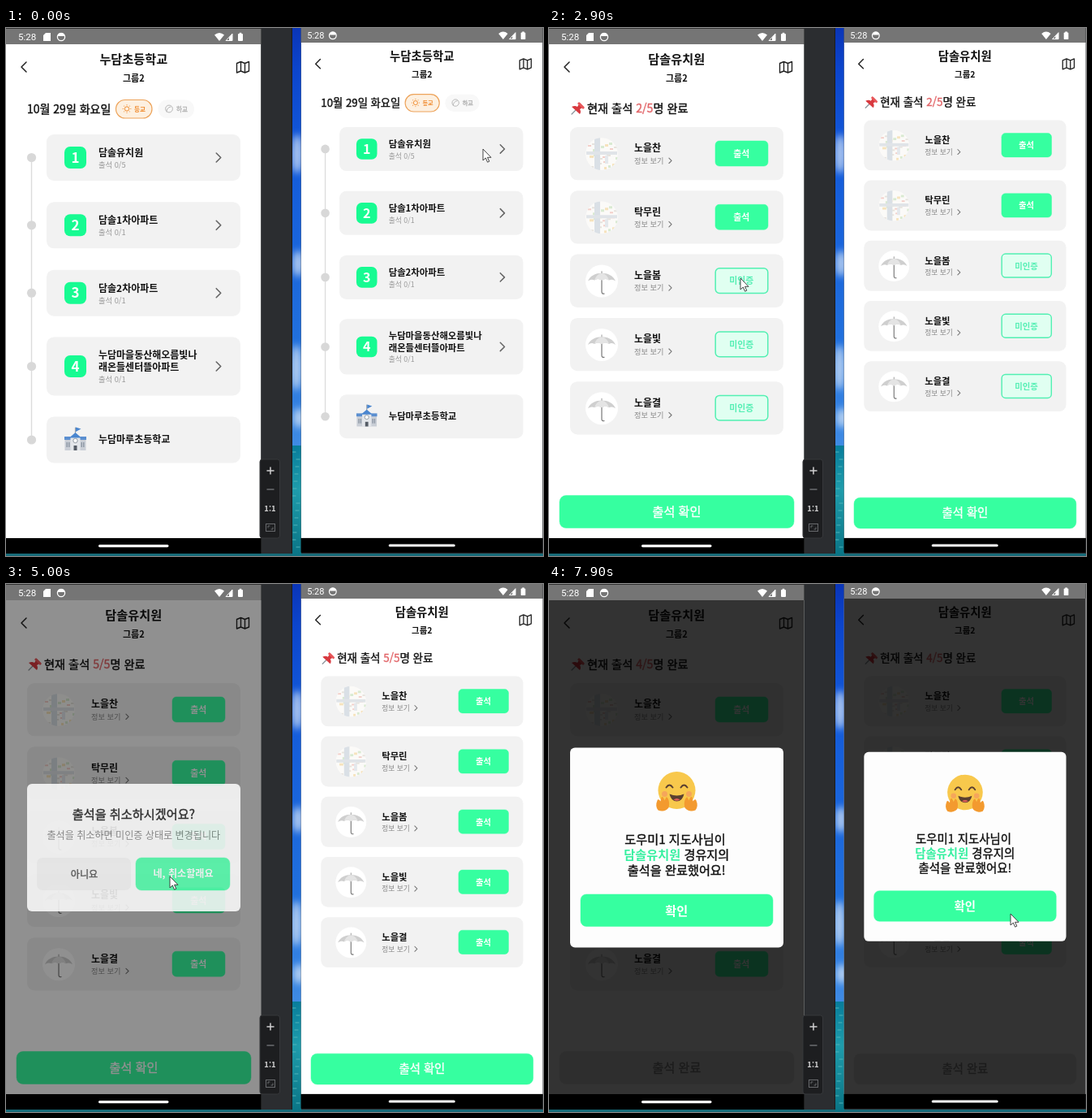
Animation, 662 px wide and 650 px high, one loop 8000 ms. Source, as an HTML page:

```html
<!DOCTYPE html>
<html lang="ko">
<head>
<meta charset="utf-8">
<title>출석 확인</title>
<style>
  html, body { margin: 0; width: 100%; height: 100%; overflow: hidden; background: #2b2d30; }
  svg { display: block; width: 662px; height: 650px; }
  text { font-family: "Noto Sans CJK KR", "Noto Sans CJK", sans-serif; }
  .clock { font-family: Roboto, sans-serif; }
  .line { fill: none; stroke-linecap: round; stroke-linejoin: round; }
</style>
</head>
<body>
<svg id="stage" viewBox="0 0 662 650" xmlns="http://www.w3.org/2000/svg"></svg>
<script>
const LOOP = 8000, STEP = 100;
const GREEN = '#36ffa0', CARD = '#f2f2f2', WIDTH = 314.4;
const SITE = '담솔유치원';
const PEOPLE = ['노을찬', '탁무린', '노을봄', '노을빛', '노을결'];

// Stops: centre, height, title lines
const STOPS = [
  [159.5, 57, [SITE]],
  [242.8, 57, ['담솔1차아파트']],
  [326.2, 57, ['담솔2차아파트']],
  [416.5, 72, ['누담마을동산해오름빛나', '래온들센터뜰아파트']],
  [507, 57, ['누담마루초등학교']]
];
// When each child is marked present
const MARKED = [1000, 1500, 3100, 4200, 3800];
const CANCELLED = 5100, FINISHED = 7200;

const PHONES = [
  { id: 'a', place: '', bottom: 628, head: 0, mid: 0, clock: 15, dot: 68, card: true, opens: 2300 },
  { id: 'b', place: 'translate(363.7 -2.2) scale(.9475)', bottom: 665, head: 1, mid: 19, clock: 8, dot: 41.3, opens: 300 }
];

// Time, x, y of the pointer tip
const PATH = [
  [0, 588, 149], [300, 588, 149], [800, 590, 144], [1000, 590, 144], [1300, 590, 218],
  [1500, 590, 218], [2000, 208, 159], [2300, 208, 159], [2900, 236, 308], [3200, 236, 308],
  [3600, 601, 432], [3800, 601, 432], [4150, 236, 386], [4500, 236, 386], [4800, 202, 360],
  [5200, 202, 360], [5900, 609, 628], [6050, 609, 628], [6350, 540, 598], [6500, 540, 598],
  [6900, 573, 379], [7200, 573, 379], [7600, 569, 406], [8000, 569, 406]
];

const rect = (x, y, w, h, fill, r = 0, more = '') =>
  `<rect x="${x}" y="${y}" width="${w}" height="${h}" rx="${r}" fill="${fill}" ${more}/>`;
const circle = (x, y, r, fill, more = '') => `<circle cx="${x}" cy="${y}" r="${r}" fill="${fill}" ${more}/>`;
const line = (d, color, width = 1.5) => `<path class="line" d="${d}" stroke="${color}" stroke-width="${width}"/>`;
const shape = (d, fill) => `<path d="${d}" fill="${fill}"/>`;
const group = (body, attrs = '') => `<g ${attrs}>${body}</g>`;
// y is the middle of the line of text; a thin stroke stands in for the medium weight
const text = (x, y, size, str, fill = '#111', weight = 400, anchor = 'start', more = '') =>
  `<text x="${x}" y="${y + size * .37}" font-size="${size}" fill="${fill}" font-weight="${weight === 500 ? 400 : weight}" text-anchor="${anchor}" ${weight === 500 ? `stroke="${fill}" stroke-width=".4"` : ''} ${more}>${str}</text>`;
const mid = (y, size, str, fill, weight, x = 157.3) => text(x, y, size, str, fill, weight, 'middle');
const chevron = (x, y, s, color, width) => line(`M${x - s / 2} ${y - s}l${s} ${s}l${-s} ${s}`, color, width);
const button = (x, y, w, h, r, more = '') =>
  rect(x, y, w, h, GREEN, r, `stroke="${GREEN}" stroke-opacity=".5" ${more}`);

function defs() {
  let blocks = '';
  for (let i = 0; i < 26; i++) {
    const x = -18 + (i * 7) % 37, y = -17 + (i * 11) % 34;
    blocks += rect(x, y, 3 + i % 3, 2 + i % 2, ['#f3cfc9', '#d9ead2', '#e6e3dd', '#f6e3bd'][i % 4]);
  }
  const map = circle(0, 0, 20, '#fbfaf8') + blocks +
    rect(-9, -20, 7, 40, '#dae0e6') + rect(-19, -3, 38, 4, '#e0e4e8') + rect(4, 2, 4, 10, '#e4e8ec');
  const umbrella = circle(0, 0, 20, '#fff') +
    line('M0 -8V13q0 3 3 2.500', '#777', 1.2) +
    shape('M-17 0C-12 -13 12 -13 17 0Q13 -3 9 -1Q5 -4 0 -1Q-5 -4 -9 -1Q-13 -3 -17 0Z', '#cfcfcf') +
    shape('M-9 -1Q-7 -8 0 -10Q7 -8 9 -1Q5 -4 0 -1Q-5 -4 -9 -1Z', '#e4e4e4') + line('M0 -12v2', '#999', 1);
  return `<defs>
    <linearGradient id="sky" x2="0" y2="1"><stop stop-color="#0a35b8"/><stop offset=".1" stop-color="#0c45cc"/>
      <stop offset=".3" stop-color="#135ada"/><stop offset=".75" stop-color="#2170dd"/><stop offset="1" stop-color="#3f8be4"/></linearGradient>
    <linearGradient id="sea" x2="0" y2="1"><stop stop-color="#087d9b"/><stop offset=".4" stop-color="#1f9cab"/>
      <stop offset="1" stop-color="#0a7485"/></linearGradient>
    <filter id="soft" x="-1" y="-1" width="3" height="3"><feGaussianBlur stdDeviation="4"/></filter>
    <clipPath id="round"><circle r="20"/></clipPath>
    <clipPath id="strip"><rect x="353" width="11" height="650"/></clipPath>
    ${PHONES.map(p => `<clipPath id="clip-${p.id}">${rect(0, 20 + p.head, WIDTH, p.bottom - 20 - p.head, '#000')}</clipPath>`).join('')}
    ${group(map, 'id="map" clip-path="url(#round)"')}
    ${group(umbrella, 'id="umbrella"')}
  </defs>`;
}

function desktop() {
  const clouds = [[359, 155, 24], [360, 290, 16], [358, 418, 28], [361, 480, 12]]
    .map(([x, y, h]) => `<ellipse cx="${x}" cy="${y}" rx="7" ry="${h}" fill="#dce8f6" opacity=".75" filter="url(#soft)"/>`).join('');
  let waves = '';
  for (let i = 0; i < 14; i++) waves += line(`M${353 + i * 5 % 6} ${522 + i * 9}h4`, '#4fb3b9', 1);
  return rect(0, 0, 662, 650, '#2b2d30') + rect(0, 647, 662, 3, '#176b79') +
    rect(353, 0, 11, 514, 'url(#sky)') + rect(353, 514, 11, 136, 'url(#sea)') +
    group(clouds + waves, 'clip-path="url(#strip)"') +
    rect(352, 0, 1, 647, '#1c1d20') + rect(661, 0, 1, 646, '#39424a');
}

function toolbar() {
  return rect(313, 531, 24.5, 97, '#1d1e20', 3, 'stroke="#36383b"') +
    line('M322 545h8M326 541v8', '#d0d0d0', 1.5) + line('M322 568h8', '#6b6d70', 1.5) +
    text(325.5, 591, 9.5, '1:1', '#d0d0d0', 700, 'middle') +
    rect(320.5, 610.5, 11, 9, 'none', 0, 'stroke="#686a6d"') +
    line('M323 615v-2h2M329 615v2h-2', '#686a6d', 1);
}

function status(p) {
  const body = rect(0, 1, WIDTH, 19, '#757575') +
    text(p.clock, 11, 11.6, '5:28', '#fff', 400, 'start', 'class="clock"') +
    (p.card ? shape('M49 6h6v10h-9V9Z', '#fff') : '') +
    circle(p.dot, 11, 4.6, 'none', 'stroke="#fff" stroke-width="1.3"') +
    shape(`M${p.dot - 4} 10a4 4 0 0 1 8 0Z`, '#fff') +
    shape('M257 8.500Q263 3.500 269 8.500L263 16Z', '#fff') +
    line('M271.500 15.500h7.500v-8Z', '#fff', 1) + shape('M275 16h4V7.500l-4 4Z', '#fff') +
    rect(286, 7, 6, 9, '#fff', 1) + rect(287.7, 5.8, 2.6, 2, '#fff');
  return group(body, `transform="translate(0 ${p.head * 1.2})"`);
}

const header = (p, title) => group(
  line('M25 42l-6 6 6 6', '#222', 1.5) + mid(38.5, 15.2, title, '#111', 700) + mid(61.5, 11, '그룹2', '#111', 700) +
  line('M284.500 43.500l5-2 5 2 5-2v11.500l-5 2-5-2-5 2ZM289.500 41.500v11.500M294.500 43.500v11.500', '#222', 1.4),
  `transform="translate(0 ${p.head * .9})"`);

function pills() {
  let rays = '';
  for (let i = 0; i < 8; i++) rays += `<path d="M0 -4.300v-1" transform="translate(149 99.500) rotate(${i * 45})" stroke="#f08a2c"/>`;
  return rect(135.5, 88.5, 44.5, 22.5, '#fdf0e0', 11.2, 'stroke="#eda35a" stroke-width="1.2"') +
    circle(149, 99.5, 2.7, 'none', 'stroke="#f08a2c"') + rays + text(158, 99.8, 7.6, '등교', '#f08a2c', 700) +
    rect(187.5, 88.5, 44.5, 22.5, '#f8f8f8', 11.2) +
    circle(201, 99.5, 4.4, 'none', 'stroke="#b5b5b5"') + line('M198 103q0-5 5-6', '#b5b5b5', 1) +
    text(210, 99.8, 7.6, '하교', '#b5b5b5', 500);
}

function school(x, y) {
  return group(line('M0 -6V-15', '#9aa3ad', 1.2) + shape('M.5 -15.500l6.500 2-6.500 3.500Z', '#4a86cf') +
    rect(-13, -2, 26, 15, '#c9ced6') + rect(-13.5, -4, 8, 4, '#5b8fd0') + rect(5.5, -4, 8, 4, '#5b8fd0') +
    rect(-6, -4, 12, 17, '#e3e6ea') + shape('M-7.500 -2.500L0 -9l7.500 6.500Z', '#4a86cf') +
    circle(0, 1, 2.7, '#fff', 'stroke="#7d8791" stroke-width=".8"') + rect(-2, 7, 4, 6, '#555c66') +
    [-11, -8.5, 7, 9.5].map(v => rect(v, 3, 1.5, 6, '#8f99a6')).join(''),
    `transform="translate(${x} ${y})"`);
}

function listPage(p) {
  const cards = STOPS.map(([y, h, lines], i) => {
    const last = i === 4;
    const top = last ? y : y - (lines.length > 1 ? 14 : 6);
    const body = rect(50, y - h / 2, 239, h, CARD, 9) +
      (last ? school(85.5, y) : rect(72, y - 13.5, 27, 27, '#17fb92', 7) +
        mid(y, 17, i + 1, '#fff', 700, 85.5) + chevron(262, y, 5.5, '#666', 1.6)) +
      lines.map((s, n) => text(114, top + n * 15.5, 12, s, '#111', 700)).join('') +
      (last ? '' : text(114, top + lines.length * 15.5 - .5, 9.3, `출석 0/${i ? 1 : 5}`, '#999', 400, 'start', i ? '' : `id="seen-${p.id}"`));
    return circle(31.5, y, 5.6, '#d8d8d8') + group(body, i ? '' : `id="first-${p.id}"`);
  }).join('');
  return rect(0, 19, WIDTH, p.bottom, '#fff') + header(p, '누담초등학교') +
    text(26, 99.8, 14, '10월 29일 화요일', '#111', 500) + pills() + line('M31.500 160V507', '#dcdcdc', 1.4) + cards;
}

function pin() {
  return group(line('M-1 2l-5 5', '#8a9299', 1.3) + shape('M-6 -2Q-2 -4 1 -2L4 -7L9 -2L4 1Q6 4 4 7Z', '#d8393f') +
    shape('M3 -8L10 -1L8 1L1 -6Z', '#e8575a'), 'transform="translate(34 99)"');
}

function detailPage(p) {
  const rows = PEOPLE.map((name, i) => {
    const y = 122 + 78.3 * i;
    return rect(26, y, 263, 65.3, CARD, 9) +
      `<use href="#${i < 2 ? 'map' : 'umbrella'}" x="65" y="${y + 33}"/>` +
      text(105, y + 26, 12, name, '#111', 700) + text(105, y + 41.3, 9.2, '정보 보기', '#888') +
      chevron(149.5, y + 41.3, 3.2, '#777', 1.1) +
      group(button(205, y + 17, 65, 31, 5) + mid(y + 32.7, 10.9, '출석', '#fff', 700, 237.2), `id="on-${p.id}${i}"`) +
      group(rect(205.2, y + 17.2, 64.6, 30.6, '#e0fff1', 5, 'stroke="#52f0b2" stroke-width="1.5"') +
        mid(y + 32.7, 10.9, '미인증', '#55efb4', 700, 237.2), `id="off-${p.id}${i}"`);
  }).join('');
  const footer = group(
    button(13, 575.5, 289, 40, 8, `id="bar-${p.id}"`) +
    text(157.5, 595.5, 15.1, '출석 확인', '#fff', 500, 'middle', `id="label-${p.id}"`),
    `transform="translate(0 ${p.bottom - 628})"`);
  return rect(0, 19, WIDTH, p.bottom, '#fff') + header(p, SITE) + pin() +
    text(47, 98.8, 14.2, `현재 출석 <tspan id="count-${p.id}" fill="#e2676a" stroke="#e2676a">0/5</tspan>명 완료`, '#111', 500) +
    rows + footer;
}

const panel = (y, h) => rect(26, y, 263, h, '#fdfdfd', 6);
const choices = (y, no, yes, id) => rect(38, y, 116, 40, '#f4f4f4', 7) + mid(y + 20, 12.2, no, '#555', 500, 96.5) +
  group(button(160, y, 116, 40, 7) + mid(y + 20, 12.1, yes, '#fff', 700, 218.5), `id="${id}"`);
const green = str => `<tspan fill="#36f0a0" stroke="none" font-weight="700">${str}</tspan>`;

const cancelBox = () => panel(246, 157) + mid(283.5, 15.2, '출석을 취소하시겠어요?', '#222', 500) +
  mid(309.5, 12.1, '출석을 취소하면 미인증 상태로 변경됩니다', '#888', 400) + choices(337, '아니요', '네, 취소할래요', 'undo');

const confirmBox = () => panel(226, 197) + mid(263, 15.2, '출결을 모두 확인하셨나요?', '#111', 700) +
  mid(291.5, 12.2, `현재 미인증 상태인 ${green(PEOPLE[3])} 학생은`, '#888', 400) +
  mid(307.3, 12.2, '자동으로 결석 처리 됩니다.', '#888', 400) +
  mid(330, 10.5, '출결확인을 완료하면 출결을 다시 변경할 수 없습니다.', '#d9605f', 400) + choices(357, '아니오', '네', 'agree');

function face() {
  const hand = s => group(
    shape('M-7 6C-9 -1 -6 -8 -4 -7L-2 -3Q0 -9 2 -7L3 -2Q6 -6 7 -3Q10 4 6 9Q-2 12 -7 6Z', '#f39a2f'),
    `transform="translate(${s * 17} 14) scale(${s} 1)"`);
  return group(circle(0, -1.5, 23, '#f8c84c') + line('M-13 -5q4-6 8 0M5 -5q4-6 8 0', '#5b4030', 2) +
    shape('M-9 3Q0 7 9 3Q7 12 0 12Q-7 12 -9 3Z', '#5b4030') + shape('M-4 10Q0 7 4 10Q0 12.500 -4 10Z', '#e0605a') +
    circle(-15, 3, 3.5, '#f5a65b') + circle(15, 3, 3.5, '#f5a65b') + hand(-1) + hand(1),
    'transform="translate(157.500 255.500)"');
}

const doneBox = () => panel(201.5, 246) + face() +
  mid(314, 15.2, '도우미1 지도사님이', '#111', 500, 155.5) + mid(333, 15.2, `${green(SITE)} 경유지의`, '#111', 500) +
  mid(352, 15.2, '출석을 완료했어요!', '#111', 500) + button(39, 382, 237, 39.5, 7) + mid(402, 15.2, '확인', '#fff', 700);

function phone(p) {
  const boxes = group(group(p.id === 'a' ? cancelBox() : confirmBox(), `id="ask-${p.id}"`) +
    group(doneBox(), `id="done-${p.id}"`), `transform="translate(0 ${p.mid})"`);
  const screen = listPage(p) + group(detailPage(p), `id="detail-${p.id}"`) +
    rect(0, 19, WIDTH, p.bottom, '#000', 0, `id="shade-${p.id}"`) + boxes;
  return group(rect(0, 0, WIDTH, p.bottom + 18, '#333') + group(screen, `clip-path="url(#clip-${p.id})"`) + status(p) +
    rect(0, p.bottom, WIDTH, 19, '#000') + rect(114, p.bottom + 8, 86.5, 3.2, '#fff', 1.6), `transform="${p.place}"`);
}

const pointer = '<path id="pointer" d="M0 0V14L3.300 11 5.600 16.200 7.800 15.200 5.500 10.300H10Z" fill="#fff" stroke="#333" stroke-width=".9"/>';
document.getElementById('stage').innerHTML = defs() + desktop() + PHONES.map(phone).join('') + toolbar() + pointer;

const nodes = {};
document.querySelectorAll('[id]').forEach(n => nodes[n.id] = n);
const set = (id, name, value) => nodes[id].setAttribute(name, value);
const paint = (id, color) => { set(id, 'fill', color); set(id, 'stroke', color); };
const ramp = (t, from, to) => Math.min(1, Math.max(0, (t - from) / (to - from)));
const fade = (t, from, to) => Math.min(ramp(t, from, from + 220), 1 - ramp(t, to, to + 220));
const smooth = k => k * k * (3 - 2 * k);
// Boxes stay solid longer than the shade behind them
const solid = k => k ** .25;

function movePointer(t) {
  const i = PATH.findIndex(q => q[0] > t);
  const [t0, x0, y0] = PATH[i - 1], [t1, x1, y1] = PATH[i];
  const k = smooth(ramp(t, t0, t1));
  set('pointer', 'transform', `translate(${x0 + (x1 - x0) * k} ${y0 + (y1 - y0) * k})`);
}

function draw(t) {
  const present = MARKED.map((at, i) => t >= at && !(i === 3 && t >= CANCELLED));
  const count = `${present.filter(Boolean).length}/5`;
  const finished = t >= FINISHED;
  for (const { id, opens } of PHONES) {
    const slide = 1 - (1 - ramp(t, opens, opens + 400)) ** 3;
    set('detail-' + id, 'transform', `translate(${WIDTH * (1 - slide)} 0)`);
    set('first-' + id, 'opacity', t >= opens - 100 && t < opens + 100 ? .2 : 1);
    nodes['seen-' + id].textContent = '출석 ' + count;
    nodes['count-' + id].textContent = count;
    present.forEach((on, i) => {
      set(`on-${id}${i}`, 'display', on ? 'inline' : 'none');
      set(`off-${id}${i}`, 'display', on ? 'none' : 'inline');
    });
    paint('bar-' + id, finished ? '#e9e9e9' : GREEN);
    paint('label-' + id, finished ? '#888' : '#fff');
    nodes['label-' + id].textContent = finished ? '출석 완료' : '출석 확인';
    const ask = id === 'a' ? fade(t, 4500, 4900) : fade(t, 6500, 7050);
    const done = fade(t, 7300, LOOP);
    set('shade-' + id, 'opacity', .8 * Math.max(ask, done));
    set('ask-' + id, 'opacity', solid(ask));
    set('done-' + id, 'opacity', solid(done));
  }
  set('undo', 'opacity', t >= 4900 ? .85 : 1);
  set('agree', 'opacity', t >= 7000 ? .9 : 1);
  movePointer(t);
}

function tick() {
  draw(Math.floor(performance.now() % LOOP / STEP) * STEP);
  requestAnimationFrame(tick);
}
tick();
</script>
</body>
</html>
```
